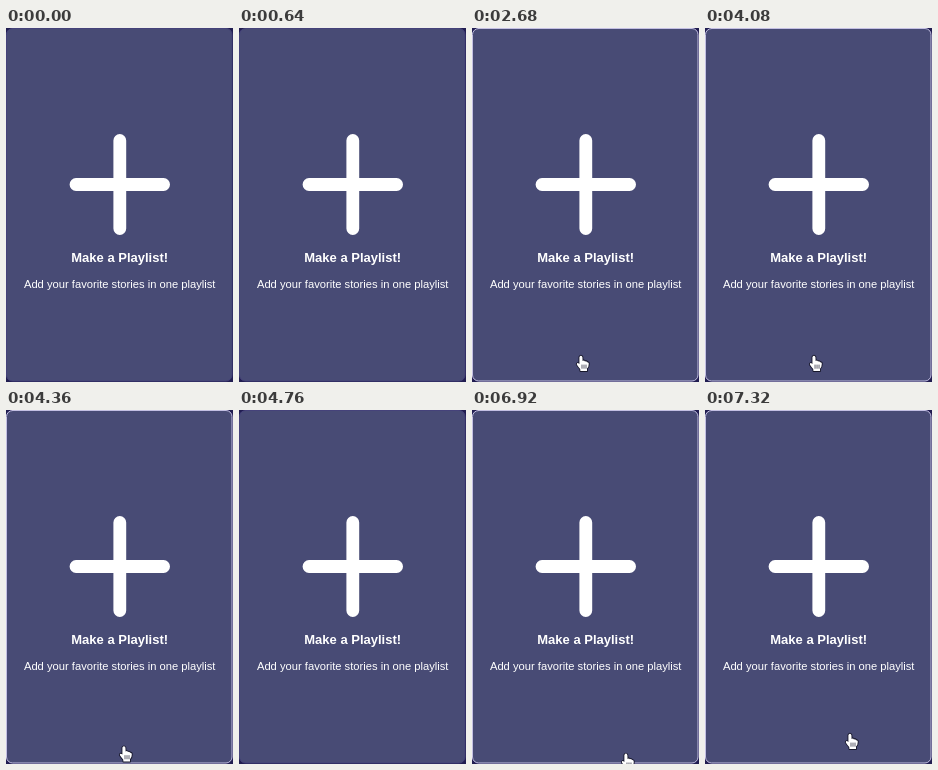
An HTML page with a canvas for the animation above (8000 ms loop, 227 by 354 pixels).

```html
<!DOCTYPE html>
<html lang="en">
<head>
<meta charset="utf-8">
<title>Playlist card</title>
<style>
  html, body { margin: 0; width: 100%; height: 100%; overflow: hidden; background: #211d51; }
  canvas { display: block; width: 227px; height: 354px; }
</style>
</head>
<body>
<canvas id="stage"></canvas>
<script>
const W = 227, H = 354, LOOP = 8000;
const canvas = document.getElementById('stage');
const ctx = canvas.getContext('2d');
const ratio = window.devicePixelRatio || 1;
canvas.width = W * ratio;
canvas.height = H * ratio;

// Fingertip positions during each visit: [time, x, y]
const visits = [
  [[2160, 109, 345.5], [2240, 109, 338], [2320, 109, 332], [2480, 109, 328],
   [4080, 109, 328], [4360, 118, 336.5], [4460, 119, 344], [4560, 120, 355]],
  [[6920, 154, 344], [7040, 151, 334], [7160, 147.5, 327], [7320, 145, 324], [8000, 145, 324]]
];

function pointerAt(time) {
  const path = visits.find(v => time >= v[0][0] && time < v[v.length - 1][0]);
  if (!path) return null;
  const i = path.findIndex(p => p[0] > time);
  const [t0, x0, y0] = path[i - 1], [t1, x1, y1] = path[i];
  const k = (time - t0) / (t1 - t0);
  return { x: x0 + (x1 - x0) * k, y: y0 + (y1 - y0) * k };
}

function drawCard(hovered) {
  ctx.fillStyle = '#211d51';
  ctx.fillRect(0, 0, W, H);
  ctx.beginPath();
  ctx.roundRect(0.5, 0.5, 225.5, 352.5, 6);
  ctx.fillStyle = '#484b75';
  ctx.fill();
  ctx.lineWidth = 1;
  ctx.strokeStyle = hovered ? '#c3bfe3' : '#45427a';
  ctx.stroke();
}

function drawPlus() {
  ctx.strokeStyle = '#fff';
  ctx.lineWidth = 12.8;
  ctx.lineCap = 'round';
  ctx.beginPath();
  ctx.moveTo(113.8, 112.5);
  ctx.lineTo(113.8, 200.5);
  ctx.moveTo(70, 156.5);
  ctx.lineTo(157.6, 156.5);
  ctx.stroke();
}

function drawText(text, y, font) {
  ctx.font = font + ' "Liberation Sans", Arial, sans-serif';
  ctx.textAlign = 'center';
  ctx.fillStyle = '#fff';
  ctx.fillText(text, 113.7, y);
}

function drawHand({ x, y }) {
  ctx.save();
  ctx.translate(x, y);
  ctx.beginPath();
  ctx.moveTo(-1.6, 8);
  ctx.lineTo(-1.6, 1);
  ctx.quadraticCurveTo(0, -1.6, 1.4, 1);
  ctx.lineTo(1.6, 5);
  ctx.quadraticCurveTo(3, 3.8, 4, 5.4);
  ctx.quadraticCurveTo(5.4, 4.6, 6, 6.2);
  ctx.quadraticCurveTo(7.8, 5.8, 7.8, 7.8);
  ctx.quadraticCurveTo(7.8, 11, 6, 12.6);
  ctx.lineTo(6, 15);
  ctx.lineTo(-0.6, 15);
  ctx.lineTo(-0.8, 13);
  ctx.quadraticCurveTo(-3, 10.4, -4.2, 8.4);
  ctx.quadraticCurveTo(-4, 6, -1.6, 8);
  ctx.closePath();
  ctx.lineJoin = 'round';
  ctx.strokeStyle = '#17172b';
  ctx.lineWidth = 1.8;
  ctx.stroke();
  ctx.fillStyle = '#fff';
  ctx.fill();
  ctx.lineWidth = 0.7;
  ctx.beginPath();
  for (const fold of [1, 3, 5]) {
    ctx.moveTo(fold, 9);
    ctx.lineTo(fold, 12.3);
  }
  ctx.stroke();
  ctx.restore();
}

function draw(time) {
  const pointer = pointerAt(time);
  ctx.setTransform(ratio, 0, 0, ratio, 0, 0);
  drawCard(pointer !== null);
  drawPlus();
  drawText('Make a Playlist!', 234, 'bold 13px');
  drawText('Add your favorite stories in one playlist', 260, '11.2px');
  if (pointer) drawHand(pointer);
}

const start = performance.now();
function tick() {
  draw((performance.now() - start) % LOOP);
  requestAnimationFrame(tick);
}
tick();
</script>
</body>
</html>
```
